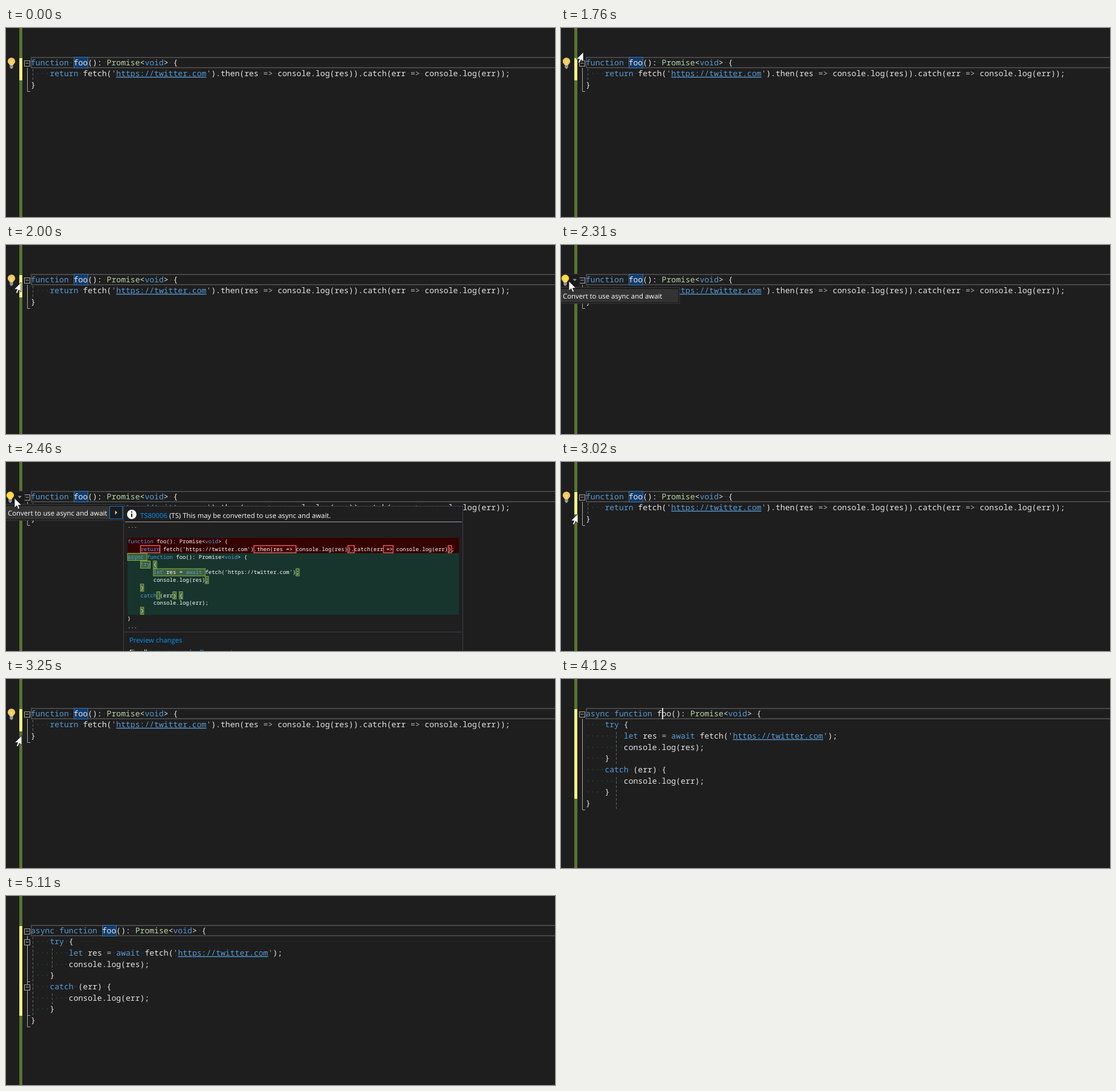
Write an HTML page that moves like this. It is 908 px wide and 314 px high and loops after 5.43 s.

```html
<!DOCTYPE html>
<html lang="en">
<head>
<meta charset="utf-8">
<title>Convert to async and await</title>
<style>
html, body { margin: 0; width: 100%; height: 100%; overflow: hidden; background: #1e1e1e; }
svg { display: block; width: 908px; height: 314px; }
text { white-space: pre; text-rendering: geometricPrecision; }
.code { font: 500 13.08px "Noto Sans Mono", "DejaVu Sans Mono", monospace; fill: #e6e6e6; }
.mini { font: 500 8.93px "Noto Sans Mono", "DejaVu Sans Mono", monospace; fill: #fff; }
.ui { font: 11.35px "Open Sans", "Noto Sans", sans-serif; fill: #fff; }
.key { fill: #569cd6; }
.type { fill: #b8d7a3; }
.op { fill: #b4b4b4; }
.quote { fill: #d69d85; }
.url { fill: #569cd6; text-decoration: underline; }
.dot { fill: #284950; }
.link { fill: #0097fb; }
.fold { fill: none; stroke: #a5a5a5; }
.guide { stroke: #666; stroke-dasharray: 4 3; }
.del { fill: #480404; stroke: #f06464; stroke-width: 1.3; }
.add { fill: #3d6040; stroke: #8fae40; }
</style>
</head>
<body>
<svg id="stage" viewBox="0 0 908 314" xmlns="http://www.w3.org/2000/svg"></svg>
<script>
const LOOP = 5430;
const LEFT = 41, TOP = 62, LINE = 18.7;
const MINI_LEFT = 201, MINI_TOP = 109.4, MINI_CHAR = 5.358, MINI_LINE = 12.8;

const escapeText = s => s.replace(/</g, '&lt;').replace(/>/g, '&gt;');
const span = (cls, s) => `<tspan class="${cls}">${escapeText(s)}</tspan>`;
const rect = (x, y, w, h, fill, extra = '') =>
  `<rect x="${x}" y="${y}" width="${w}" height="${h}" fill="${fill}" ${extra}/>`;
const label = (x, y, s, cls = '') => `<text class="ui ${cls}" x="${x}" y="${y}">${s}</text>`;
const group = (id, body) => `<g id="${id}">${body}</g>`;

const TOKENS = [
  ['key', /^(async|function|return|await|void|try|catch(?= )|let)\b/],
  ['type', /^Promise\b/],
  ['url', /^https:[\w/.]+/],
  ['op', /^(=>|=)/],
  ['quote', /^'/],
  ['dot', /^ +/],
  ['', /^(\w+|.)/]
];

function paint(line, plain) {
  let out = '';
  while (line) {
    const [cls, re] = TOKENS.find(([, r]) => r.test(line));
    const word = line.match(re)[0];
    line = line.slice(word.length);
    if (plain) out += cls === 'key' ? span(cls, word) : escapeText(word);
    else out += cls ? span(cls, cls === 'dot' ? '·'.repeat(word.length) : word) : escapeText(word);
  }
  return out;
}

// Editor rows snap to whole pixels
const codeBlock = lines => lines.map((s, i) =>
  `<text class="code" x="${LEFT}" y="${TOP + Math.floor(i * LINE)}">${paint(s)}</text>`).join('');
const miniBlock = lines => lines.map((s, i) =>
  `<text class="mini" x="${MINI_LEFT}" y="${MINI_TOP + i * MINI_LINE}">${paint(s, true)}</text>`).join('');

// Outlined change in the preview, in rows and columns
const mark = (cls, row, from, to) =>
  `<rect class="${cls}" x="${MINI_LEFT + from * MINI_CHAR}" y="${MINI_TOP + row * MINI_LINE - 9}"
    width="${(to - from) * MINI_CHAR}" height="12"/>`;

const foldBox = y => rect(30.5, y - 4.5, 9, 9, '#1e1e1e', 'class="fold"') +
  `<path class="fold" d="M32.5 ${y - .5}h5"/>`;
const foldLine = (y1, y2) => `<path class="fold" d="M35.5 ${y1}V${y2 + .5}H40"/>`;
const guide = (x, y1, y2) => `<path class="guide" d="M${x + .5} ${y1}V${y2}"/>`;
const highlight = x => rect(x + .5, 48.5, 23, 18, '#113d6f', 'stroke="#47709c"');
const margin = bottom => rect(22, 50, 5, bottom - 50, '#eff284');

const bulb = (x, color) => `<g transform="translate(${x} 56)">
  <path d="M-2.8 6C-3 3.8-6.2 3-6.2-.6A6.2 6.2 0 0 1 6.2-.6C6.2 3 3 3.8 2.8 6Z" fill="${color}"/>
  <path d="M-2-1.5L0 1L2-1.5M0 1V6" fill="none" stroke="#fff0b8"/>
  <path d="M-2.8 7.2h5.6M-2.8 9.2h5.6M-1.5 10.8h3" stroke="#d8d8d8" stroke-width="1.3"/></g>`;

const oldCode = [
  'function foo(): Promise<void> {',
  "    return fetch('https://twitter.com').then(res => console.log(res)).catch(err => console.log(err));",
  '}'
];
const newCode = [
  'async function foo(): Promise<void> {',
  '    try {',
  "        let res = await fetch('https://twitter.com');",
  '        console.log(res);',
  '    }',
  '    catch (err) {',
  '        console.log(err);',
  '    }',
  '}'
];

const before = margin(87) + foldBox(59) + foldLine(66, 105) + guide(44, 68, 87) +
  highlight(112) + codeBlock(oldCode);

const after = margin(199) + foldBox(59) +
  group('plainFold', foldLine(66, 217) + guide(91, 88, 142) + guide(91, 163, 217)) +
  group('fullFold', foldBox(77) + foldBox(152) + '<path class="fold" d="M35.5 66V72"/>' +
    foldLine(82, 142) + '<path class="fold" d="M35.5 142V147"/>' + foldLine(157, 198) + foldLine(198, 217) +
    guide(44, 68, 199) + guide(76, 87, 123) + guide(76, 162, 181)) +
  group('mention', highlight(159)) + codeBlock(newCode) +
  group('caret', rect(167, 48, 2, 19, '#dcdcdc'));

const button = rect(-1, 48.5, 31.5, 21, '#1b1b1c', 'stroke="#2b2b2e"') + bulb(7, '#ffd83c') +
  '<path d="M19.5 56.5h6.5l-3.25 3.5z" fill="#999"/>';

const menu = rect(-1, 70.5, 197, 26.5, '#1b1b1c', 'stroke="#3a3a3f"') +
  rect(0, 73, 194, 22, '#333334') + label(3, 89, 'Convert to use async and await');

const marks = [
  ['del', 3, 4, 10], ['del', 3, 39, 52], ['del', 3, 68, 70], ['del', 3, 79, 82], ['del', 3, 99, 100],
  ['add', 4, 0, 6], ['add', 5, 4, 7], ['add', 5, 8, 9], ['add', 6, 8, 24], ['add', 6, 52, 53],
  ['add', 7, 24, 25], ['add', 8, 4, 5], ['add', 9, 9, 10], ['add', 9, 14, 15], ['add', 9, 16, 17],
  ['add', 11, 4, 5]
];

const preview = rect(171.5, 73.5, 21, 21, '#1b1b1c', 'stroke="#0a7acc"') +
  '<path d="M180.5 80.5v7l3.5-3.5z" fill="#ccc"/>' +
  rect(194.5, 73.5, 561, 250, '#1f1f20', 'stroke="#3f3f46"') +
  '<circle cx="208" cy="87" r="7.8" fill="#fff"/><path d="M208 82v2M208 85.5v6" stroke="#1b1b1c" stroke-width="2"/>' +
  label(222, 93, 'TS80006', 'link') + label(270, 93, '(TS) This may be converted to use async and await.') +
  rect(197, 99, 557, 1, '#a0a0a0') + rect(201, 126, 548, 25.5, '#350000') + rect(201, 151.5, 548, 102.5, '#17352d') +
  marks.map(m => mark(...m)).join('') +
  miniBlock(['...', '', ...oldCode.slice(0, 2), ...newCode, '...']) +
  rect(195, 282, 560, 1, '#3f3f46') + label(204, 300, 'Preview changes', 'link') +
  label(204, 320, 'Fix all occurrences in:') + label(320, 320, 'Document', 'link');

const arrow = '<path d="M0 0V16L3.8 12.5L6.3 18.3L8.8 17.2L6.4 11.7H11.6Z" fill="#fff" stroke="#111" stroke-width=".8"/>';

document.getElementById('stage').innerHTML =
  rect(0, 0, 908, 314, '#1e1e1e') + rect(22, 0, 5, 314, '#577430') +
  group('region', rect(41, 48, 793, 58, '#292929')) +
  rect(42, 49, 880, 17, 'none', 'stroke="#464646" stroke-width="2"') +
  group('before', before) + group('after', after) +
  group('bulb', bulb(9, '#f0c95c')) + group('button', button) +
  group('menu', menu) + group('preview', preview) + group('pointer', arrow);

// Visible spans in ms
const shown = {
  before: [[0, 3330]],
  after: [[3330, LOOP]],
  region: [[1850, 2000]],
  bulb: [[0, 2150], [3020, 3330]],
  button: [[2150, 3020]],
  menu: [[2310, 3020]],
  preview: [[2460, 3020]],
  plainFold: [[3330, 4650]],
  fullFold: [[4650, LOOP]],
  mention: [[4730, LOOP]],
  caret: [[3400, 3570], [4120, 5110]],
  pointer: [[1760, 3330]]
};

// Time, tip x, tip y, facing (-1 over the selection margin)
const path = [
  [1760, 37, 40, -1], [1850, 35, 49, -1], [1930, 32, 57, -1], [2000, 25, 62, -1],
  [2080, 17, 62, 1], [2150, 14, 61, 1], [2230, 13, 60, 1], [2460, 14, 60, 1],
  [2560, 15, 63, 1], [2640, 18, 69, 1], [2710, 22, 76, 1], [2790, 25, 82, 1],
  [2860, 27, 85, 1], [2940, 28, 86, 1], [3020, 28, 86, -1], [3100, 27, 88, -1],
  [3180, 26, 92, -1], [3250, 26, 94, -1]
];

const nodes = Object.entries(shown).map(([id, spans]) => [document.getElementById(id), spans]);
const pointer = document.getElementById('pointer');

function draw(now) {
  const t = now % LOOP;
  for (const [node, spans] of nodes)
    node.style.display = spans.some(([a, b]) => t >= a && t < b) ? '' : 'none';
  const [, x, y, side] = path.filter(p => p[0] <= t).pop() || path[0];
  pointer.setAttribute('transform', `translate(${x} ${y}) scale(${side} 1)`);
}

const start = performance.now();
function tick() {
  draw(performance.now() - start);
  requestAnimationFrame(tick);
}
tick();
</script>
</body>
</html>
```
